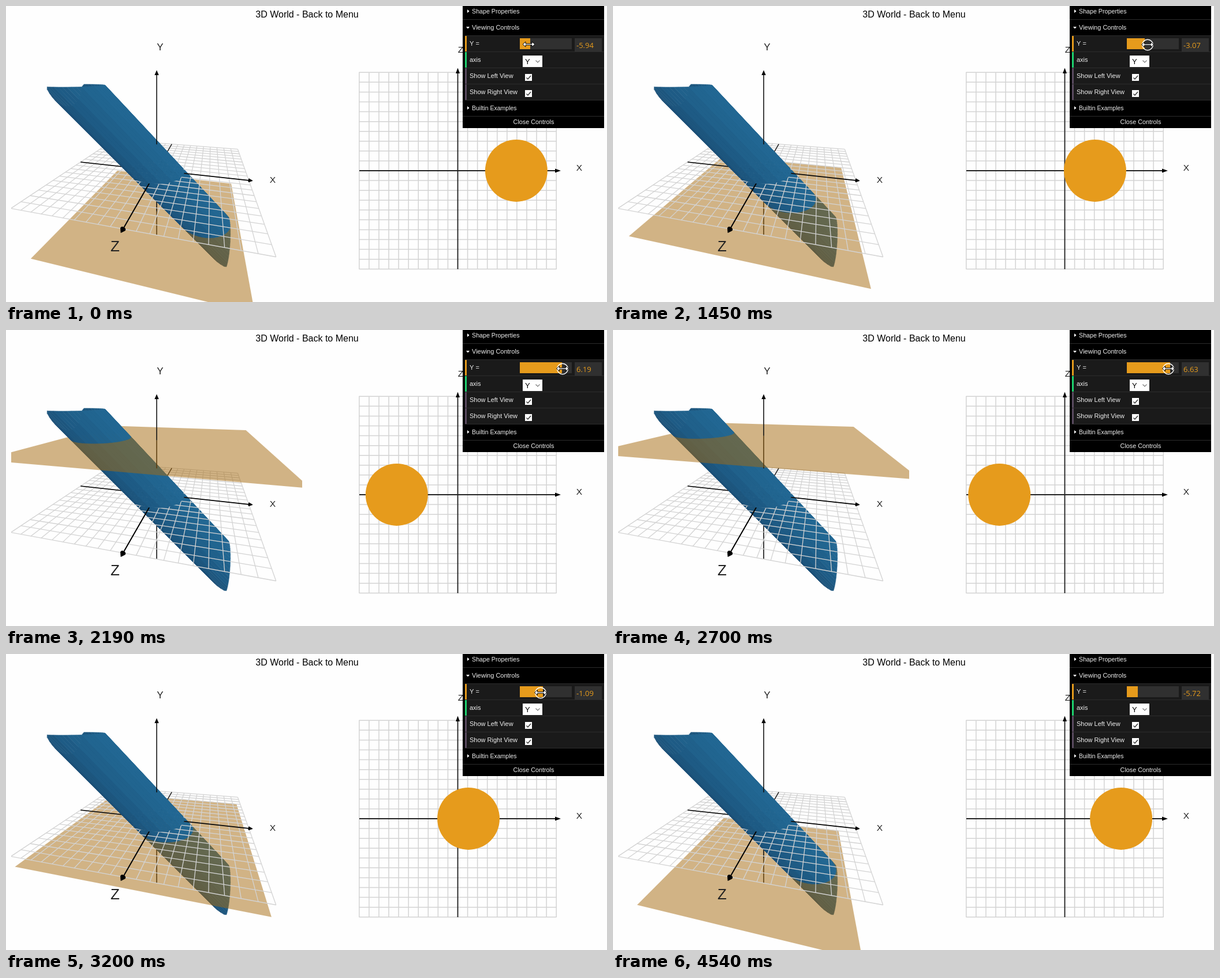
Animation of 1041 by 514 pixels, one loop 4720 ms. Source, as an HTML page with a canvas:

```html
<!DOCTYPE html>
<html>
<head>
<meta charset="utf-8">
<style>
html, body { margin: 0; width: 100%; height: 100%; overflow: hidden; background: #fefefe; }
canvas { display: block; }
</style>
</head>
<body>
<canvas id="stage" width="1041" height="514"></canvas>
<script>
const ctx = document.getElementById('stage').getContext('2d');
const LOOP = 4720, ORANGE = '#e69b1c', GRID = '#d3d3d3', SANS = '"Liberation Sans", Arial, sans-serif';
const RADIUS = Math.sqrt(10), SIDES = 48;

// Slider drag: [time, slider notch]
const drag = [[0, 0], [1140, 0], [1180, 1], [1260, 4], [1340, 8], [1420, 13], [1500, 17], [1580, 21], [1660, 24],
  [1750, 33], [1840, 37], [1910, 41], [1980, 45], [2050, 49], [2120, 53], [2190, 55], [2260, 56], [2320, 57], [2380, 58],
  [2700, 57], [2770, 54], [2840, 50], [2910, 46], [2980, 41], [3040, 33], [3120, 27], [3200, 22],
  [3300, 17], [3390, 11], [3470, 6], [3590, 3], [3670, 2], [3770, 1]];
// Pointer leaving the slider: [time, x, y]
const exit = [[4020, 930, 95], [4065, 972, 190], [4110, 1029, 363], [4150, -99, 0],
  [4370, 1031, 480], [4410, 1029, 488], [4450, 1032, 497], [4490, 1034, 507], [4540, -99, 0]];

const lastIndex = (list, t) => list.findLastIndex(step => step[0] <= t);
const sliderX = v => 890 + (v + 10) * 4.5;

function path(points, close = true) {
  ctx.beginPath();
  points.forEach(([x, y]) => ctx.lineTo(x, y));
  if (close) ctx.closePath();
}
function fill(points, color) {
  path(points);
  ctx.fillStyle = color;
  ctx.fill();
}
function line(points, color, width) {
  path(points, false);
  ctx.strokeStyle = color;
  ctx.lineWidth = width;
  ctx.stroke();
}
function rect(x, y, w, h, color) {
  ctx.fillStyle = color;
  ctx.fillRect(x, y, w, h);
}
function text(str, x, y, size, color, align = 'left', family = SANS) {
  ctx.font = `${size}px ${family}`;
  ctx.textAlign = align;
  ctx.fillStyle = color;
  ctx.fillText(str, x, y);
}

// Camera at (5, 10, 20) looking at the world origin
function project(x, y, z) {
  const scale = 341 / (22.913 - (0.2182 * x + 0.4364 * y + 0.8729 * z));
  return [261 + scale * (0.9701 * x - 0.2425 * z),
          285.4 - scale * (-0.1058 * x + 0.8997 * y - 0.4234 * z)];
}
const line3 = (a, b, color, width) => line([project(...a), project(...b)], color, width);

// Arrow head on the end of the axis with the given index
function cone(axis) {
  const ring = Array.from({ length: 13 }, (_, i) => {
    const p = [0, 0, 0], a = i * Math.PI / 6;
    p[axis] = 10;
    p[(axis + 1) % 3] = 0.2 * Math.cos(a);
    p[(axis + 2) % 3] = 0.2 * Math.sin(a);
    return project(...p);
  });
  const tip = [0, 0, 0];
  tip[axis] = 10.4;
  fill(ring, '#000');
  for (let i = 0; i < 12; i++) fill([project(...tip), ring[i], ring[i + 1]], '#000');
}

// Wall of the slanted cylinder (x + y)² + z² = 10 between two heights
const facets = Array.from({ length: SIDES }, (_, i) => {
  const angle = i => i * 2 * Math.PI / SIDES;
  const shade = 0.5 + 0.5 * Math.cos(angle(Math.floor(i / 3) * 3 + 1.5));
  const mix = (a, b) => Math.round(a + (b - a) * shade);
  return { from: angle(i), to: angle(i + 1), facing: Math.cos(angle(i + 0.5) - 0.93),
    color: `rgb(${mix(25, 34)},${mix(74, 103)},${mix(112, 147)})` };
}).sort((a, b) => a.facing - b.facing);

function cylinder(lo, hi) {
  const edge = a => {
    const dx = RADIUS * Math.cos(a), z = RADIUS * Math.sin(a);
    const bottom = Math.max(lo, dx - 9), top = Math.min(hi, 10 + dx);
    return top > bottom && [bottom, top].map(y => project(dx - y, y, z));
  };
  for (const { from, to, color } of facets) {
    const a = edge(from), b = edge(to);
    if (!a || !b) continue;
    fill([a[0], a[1], b[1], b[0]], color);
    ctx.strokeStyle = color;
    ctx.lineWidth = 0.6;
    ctx.stroke();
  }
}

function slab(lo, hi) {
  if (lo < -RADIUS) line3([0, lo, 0], [0, Math.min(hi, -RADIUS), 0], '#111', 1.6);
  cylinder(lo, Math.min(hi, 9));
  if (hi > RADIUS) line3([0, Math.max(lo, RADIUS), 0], [0, hi, 0], '#111', 1.6);
}

function floorGrid() {
  for (let i = -10; i <= 10; i++) {
    line3([i, 0, -10], [i, 0, 10], GRID, 1.3);
    line3([-10, 0, i], [10, 0, i], GRID, 1.3);
  }
  line3([-10, 0, 0], [10, 0, 0], '#000', 1.7);
  line3([0, 0, -10], [0, 0, 0], '#000', 1.3);
  line3([0, 0, 0], [0, 0, 10], '#000', 2);
  cone(0);
  cone(2);
  text('X', 462, 307, 15.5, '#222', 'center');
  text('Z', 189, 426, 26, '#222', 'center');
}

function cutPlane(y) {
  fill([project(-10, y, -10), project(10, y, -10), project(10, y, 10), project(-10, y, 10)],
    'rgba(166,107,15,.5)');
}

// Every layer hides what lies below it, so draw upwards
function leftView(y) {
  ctx.save();
  ctx.beginPath();
  ctx.rect(9, 24, 504, 490);
  ctx.clip();
  slab(-10, Math.min(0, y));
  if (y < 0) {
    cutPlane(y);
    slab(y, 0);
    floorGrid();
    slab(0, 10);
  } else {
    floorGrid();
    slab(0, y);
    cutPlane(y);
    slab(y, 10);
  }
  cone(1);
  text('Y', 267, 77, 17, '#222', 'center');
  ctx.restore();
}

function rightView(y) {
  const cx = 782.5, cy = 286, unit = 17.07;
  for (let i = -10; i <= 10; i++) {
    const d = i * unit;
    line([[cx + d, cy - 171], [cx + d, cy + 171]], GRID, 1.5);
    line([[cx - 171, cy + d], [cx + 171, cy + d]], GRID, 1.5);
  }
  line([[612, cy], [953, cy]], '#222', 1.8);
  line([[cx, 457], [cx, 115]], '#222', 1.8);
  fill([[961, cy], [951, cy - 3.5], [951, cy + 3.5]], '#000');
  fill([[cx, 107.5], [cx - 3.5, 117], [cx + 3.5, 117]], '#000');
  text('X', 993, 286, 15.5, '#222', 'center');
  text('Z', 787.5, 81, 15.5, '#222', 'center');
  ctx.beginPath();
  ctx.arc(cx - y * unit, cy, RADIUS * unit, 0, 7);
  ctx.fillStyle = ORANGE;
  ctx.fill();
}

function checkbox(y) {
  rect(899, y, 12, 12, '#fff');
  line([[901.5, y + 6.5], [904, y + 9], [909, y + 3]], '#333', 1.4);
}

function panel(y) {
  rect(791, 0, 245, 212, '#000');
  rect(798, 52, 238, 111, '#1a1a1a');
  [ORANGE, '#1ed36f', '#5a4b60', '#5a4b60'].forEach((c, i) => rect(795, 52 + 28 * i, 3, 27, c));
  for (let i = 0; i < 7; i++) rect(i > 0 && i < 6 ? 795 : 791, 23 + 28 * i, 245, 1, '#2c2c2c');
  rect(1036, 0, 5, 212, '#fefefe');

  text('Shape Properties', 807, 13, 10.7, '#eee');
  text('Viewing Controls', 807, 41, 11, '#eee');
  text('Builtin Examples', 807, 181, 10.5, '#eee');
  text('Close Controls', 914, 205, 10.8, '#eee', 'center');
  ['Y =', 'axis', 'Show Left View', 'Show Right View'].forEach((s, i) => text(s, 803, 69 + 28 * i, 11, '#eee'));
  for (const ty of [9, 177]) fill([[799, ty - 3], [802.5, ty], [799, ty + 3]], '#fff');
  fill([[797, 36], [803, 36], [800, 39.5]], '#fff');

  rect(890, 56, 90, 19, '#303030');
  rect(890, 56, Math.round(sliderX(y)) - 890, 19, ORANGE);
  rect(985, 56, 47, 23, '#303030');
  text(String(+y.toFixed(2)), 988, 73, 13, ORANGE, 'left', '"Open Sans", "Noto Sans", sans-serif');

  rect(895, 86, 34, 20, '#fff');
  text('Y', 899, 101, 13, '#000');
  line([[917.5, 94.5], [921, 98], [924.5, 94.5]], '#777', 1.1);
  checkbox(118);
  checkbox(146);
}

function resizeCursor(x, y, pressed) {
  if (pressed) {
    ctx.beginPath();
    ctx.arc(x, y + 0.5, 9.3, 0, 7);
    ctx.strokeStyle = '#fff';
    ctx.lineWidth = 1.5;
    ctx.stroke();
  }
  const half = [[-10.5, 0], [-5.5, -4.5], [-5.5, -1.2], [5.5, -1.2], [5.5, -4.5]];
  const shape = [...half, ...half.map(([a, b]) => [-a, -b])].map(([a, b]) => [x + a, y + b]);
  fill(shape, '#fff');
  ctx.strokeStyle = '#000';
  ctx.lineWidth = 1;
  ctx.stroke();
}

function pointer(x, y) {
  fill([[0, 0], [0, 16], [4, 12.5], [6.5, 18], [9, 17], [6.5, 11.5], [11.5, 11.5]]
    .map(([a, b]) => [x + a + 0.5, y + b + 0.5]), '#fff');
  ctx.strokeStyle = '#000';
  ctx.lineWidth = 1;
  ctx.stroke();
}

function cursor(t, valueOf, index) {
  if (t >= exit[0][0]) {
    const [, x, y] = exit[lastIndex(exit, t)];
    pointer(x, y);
  } else if (t < 1140) {
    resizeCursor(t < 490 ? 905.5 : t < 600 ? 907.5 : 909, 66.5);
  } else {
    // the hand runs one step ahead of the slider
    const next = drag[index + 1];
    const lead = next && next[0] - drag[index][0] <= 130 ? next : drag[index];
    resizeCursor(Math.round(sliderX(valueOf(lead)) + 0.5), 67, t < 3980);
  }
}

function draw(now) {
  const t = now % LOOP;
  const valueOf = ([, notch]) => -5.94 + 0.2206 * notch;
  const index = lastIndex(drag, t), y = valueOf(drag[index]);
  rect(0, 0, 1041, 514, '#fefefe');
  text('3D World - Back to Menu', 521.5, 20, 16, '#000', 'center');
  leftView(y);
  rightView(y);
  panel(y);
  cursor(t, valueOf, index);
}

const start = performance.now();
function tick() {
  draw(performance.now() - start);
  requestAnimationFrame(tick);
}
tick();
</script>
</body>
</html>
```
